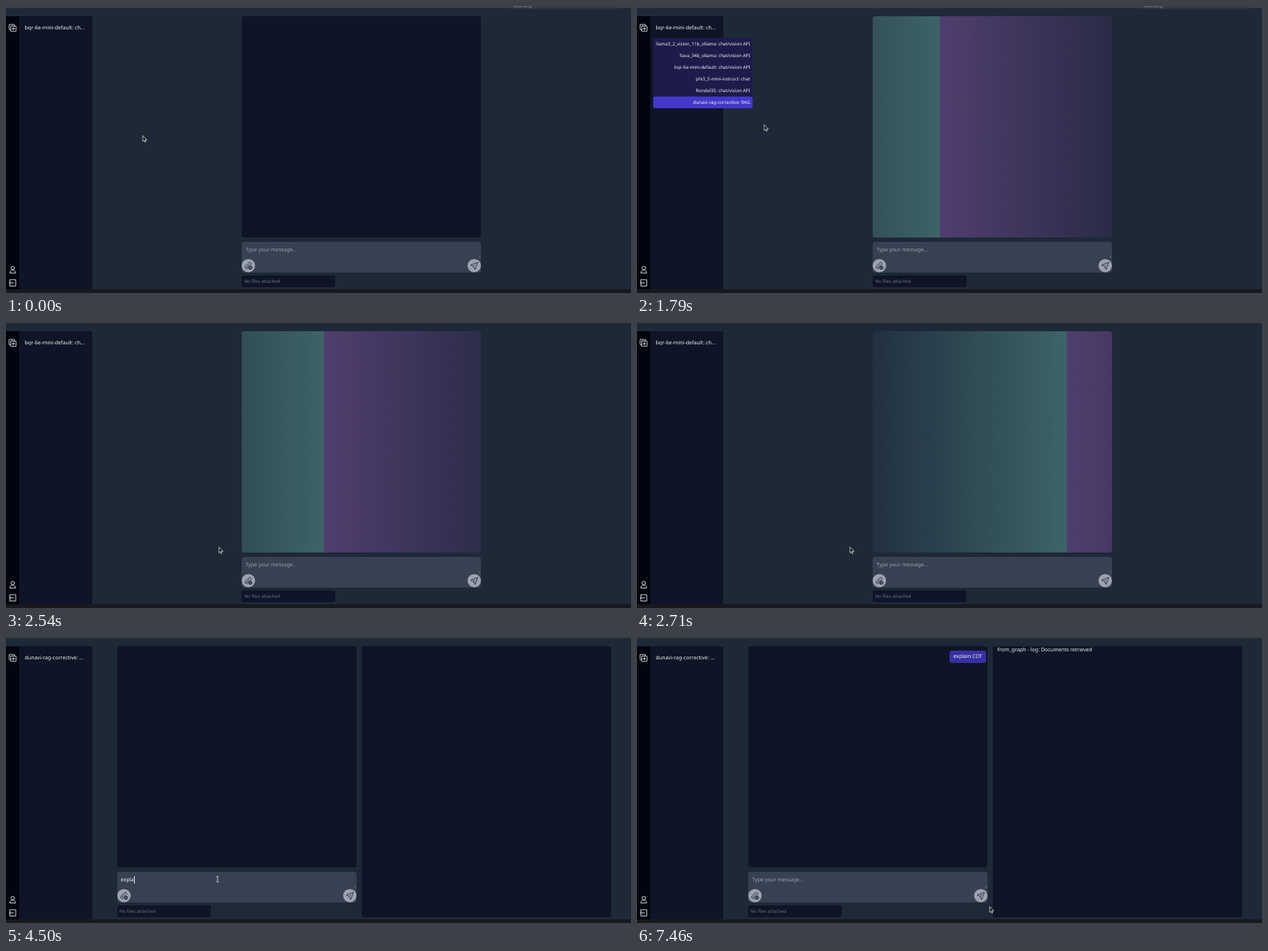
These frames come from a looping animation (854 px wide and 393 px high, 8 s). An HTML page:

```html
<!DOCTYPE html>
<html lang="en">
<head>
<meta charset="utf-8">
<title>Chat demo</title>
<style>
  :root {
    --panel: #0f1526;
    --loop: 8s infinite;
    --step: 8s step-end infinite;
  }
  html, body { margin: 0; width: 100%; height: 100%; overflow: hidden; }
  body {
    position: relative;
    background: #1e2937;
    color: #f3f4f6;
    font: 7.1px/10px "Noto Sans", sans-serif;
    text-rendering: geometricPrecision;
  }
  body *, .typed::before { position: absolute; box-sizing: border-box; }
  span { white-space: pre; }
  svg { left: 0; top: 0; overflow: visible; fill: none; stroke-linecap: round; stroke-linejoin: round; }
  svg * { position: static; }

  .strip { left: 0; width: 100%; }
  .top { top: 0; height: 3px; background: #3b3d40; }
  .bottom { top: 388px; bottom: 0; background: #17191d; }

  .rail { left: 0; top: 14px; width: 18px; height: 374px; background: #02040f; }
  .side { left: 18px; top: 14px; width: 99.5px; height: 374px; background: var(--panel); border-radius: 0 3px 3px 0; }
  .side span { left: 7.5px; top: 10.6px; }
  .before { animation: hide-late var(--step); }
  .after { opacity: 0; animation: show-late var(--step); }
  @keyframes hide-late { 0% { opacity: 1 } 36.45%, 100% { opacity: 0 } }
  @keyframes show-late { 0% { opacity: 0 } 36.45%, 100% { opacity: 1 } }

  /* recording notice */
  .notice {
    left: 688px; top: 0; width: 150px; height: 5px; overflow: hidden;
    background: #383b40; border-radius: 0 0 3px 3px;
    animation: notice var(--loop) linear;
  }
  .notice span { left: 3px; top: -4.6px; font-size: 5.8px; color: #fff; }
  @keyframes notice {
    0%, .5% { opacity: .45; transform: scaleX(.98) }
    3.1%, 21.25% { opacity: 1; transform: none }
    22.375% { opacity: .45; transform: scaleX(.98) }
    24%, 100% { opacity: 0; transform: scaleX(.96) }
  }

  /* chat column */
  .chat { left: 322px; top: 0; width: 327px; height: 100%; animation: dock var(--step); }
  @keyframes dock { 0% { left: 322px } 36.45%, 100% { left: 151.5px } }
  .log, .loader { left: 0; top: 14px; width: 100%; height: 302.5px; border-radius: 3px; background: var(--panel); }
  .loader {
    background: linear-gradient(90deg, #503e6e, #1c2438 50%, #3c6466) 0 0 / 654px 100%;
    opacity: 0;
    animation: loading var(--step), shimmer calc(8s / 11) linear infinite;
  }
  @keyframes loading { 0% { opacity: 0 } 20.75% { opacity: 1 } 36.45%, 100% { opacity: 0 } }
  @keyframes shimmer { from { background-position: 443.3px 0 } to { background-position: 1097.3px 0 } }

  .bubble {
    left: 275px; top: 19.5px; width: 50px; height: 17.5px; border-radius: 3.5px;
    background: #3730a3; line-height: 17px; text-align: center;
    opacity: 0; animation: sent var(--step);
  }
  @keyframes sent { 0% { opacity: 0 } 75%, 100% { opacity: 1 } }

  .input { left: 0; top: 323px; width: 100%; height: 42px; border-radius: 4px; background: #374151; }
  .hint, .typed { left: 5.3px; top: 5.8px; }
  .hint { color: #9ca3af; animation: hint var(--step); }
  @keyframes hint { 0% { opacity: 1 } 46.85% { opacity: 0 } 75%, 100% { opacity: 1 } }
  .typed { opacity: 0; animation: focus var(--step); }
  @keyframes focus { 0% { opacity: 0 } 36.45% { opacity: 1 } 75%, 100% { opacity: 0 } }
  .typed::before {
    content: ""; left: 0; top: 0; height: 10px;
    border-right: .7px solid #f3f4f6;
    animation: type var(--step);
  }
  @keyframes type {
    0% { content: "" }
    46.85% { content: "e" }
    48.5% { content: "ex" }
    51% { content: "exp" }
    52.1% { content: "expl" }
    56.2% { content: "expla" }
    58.35% { content: "explai" }
    59.35% { content: "explain" }
    60.35% { content: "explain " }
    64.1% { content: "explain C" }
    66.1% { content: "explain CO" }
    67.75% { content: "explain COT" }
    75%, 100% { content: "" }
  }
  .files { left: 0; top: 369px; width: 128px; height: 15.5px; border-radius: 3px; background: var(--panel); }
  .files span { left: 3.4px; top: 2.6px; font-size: 6.22px; color: #6b7280; }

  /* trace panel */
  .trace {
    left: 485.5px; top: 14px; width: 341.5px; height: 370.5px; border-radius: 3px;
    background: var(--panel); animation: fly var(--loop) linear;
  }
  .trace span { left: 7px; top: -.4px; opacity: 0; animation: traced var(--step); }
  @keyframes fly {
    0% { opacity: 0; transform: translateX(20px) }
    36.6% { opacity: 0; transform: translateX(20px); animation-timing-function: cubic-bezier(.215, .61, .355, 1) }
    41.5%, 100% { opacity: 1; transform: none }
  }
  @keyframes traced { 0% { opacity: 0 } 93.2%, 100% { opacity: 1 } }

  /* model menu */
  .menu {
    left: 22px; top: 43.5px; width: 136px; height: 96px; border-radius: 3px;
    background: #1e1b4b; opacity: 0; animation: menu var(--step);
  }
  @keyframes menu { 0% { opacity: 0 } 14% { opacity: 1 } 23.75%, 100% { opacity: 0 } }
  .menu div { left: 0; width: 100%; height: 16px; border-radius: 3px; background: #4338ca; animation: hover var(--step); }
  @keyframes hover {
    0% { top: 0; opacity: 0 }
    16.5% { top: 0; opacity: 1 }
    17% { top: 16px }
    17.5% { top: 32px }
    18% { top: 48px }
    18.45% { top: 64px; opacity: 1 }
    19.15%, 100% { top: 80px; opacity: 1 }
  }
  .menu span { right: 3.5px; top: 0; text-align: right; font-size: 6.22px; line-height: 16px; }

  /* pointer */
  .pointer { left: 0; top: 0; animation: move var(--loop) linear; }
  @keyframes move {
    0% { transform: translate(187px, 178px) }
    5.25% { transform: translate(187px, 178px); animation-timing-function: ease-in-out }
    12.5% { transform: translate(72px, 28px) }
    15.625% { transform: translate(72px, 30px) }
    18.25% { transform: translate(78px, 117px) }
    18.75% { transform: translate(79px, 127px) }
    20.25% { transform: translate(79px, 128px) }
    22.375% { transform: translate(173px, 162px); animation-timing-function: ease-out }
    25.5% { transform: translate(291px, 310px) }
    36.5% { transform: translate(291px, 310px); animation-timing-function: ease-in-out }
    41.25% { transform: translate(289px, 333px) }
    75% { transform: translate(289px, 333px); animation-timing-function: ease-in-out }
    80.5% { transform: translate(505px, 352px); animation-timing-function: ease-in-out }
    84.875%, 100% { transform: translate(482px, 371px) }
  }
  .arrow { animation: arrow var(--step); }
  .hand { opacity: 0; animation: hand var(--step); }
  .beam { opacity: 0; animation: beam var(--step); }
  @keyframes arrow {
    0% { opacity: 1 } 10.5% { opacity: 0 } 22% { opacity: 1 }
    39.25% { opacity: 0 } 79% { opacity: 1 } 100% { opacity: 1 }
  }
  @keyframes hand { 0% { opacity: 0 } 10.5% { opacity: 1 } 22%, 100% { opacity: 0 } }
  @keyframes beam { 0% { opacity: 0 } 39.25% { opacity: 1 } 79%, 100% { opacity: 0 } }
</style>
</head>
<body>
  <div class="strip top"></div>
  <div class="strip bottom"></div>
  <div class="notice"><span>recording</span></div>

  <div class="rail"></div>
  <div class="side">
    <span class="before">bqr-6e-mini-default: ch...</span>
    <span class="after">dunavi-rag-corrective: ...</span>
  </div>
  <svg width="18" height="393" stroke="#e5e7eb" stroke-width=".9">
    <path d="M6 32.5H5a.8.8 0 0 1-.8-.8V26a.8.8 0 0 1 .8-.8h5.7a.8.8 0 0 1 .8.8v1"/>
    <rect x="6.4" y="27.4" width="7.4" height="7.4" rx=".8"/>
    <path d="M10.1 29.2v3.8M8.2 31.1H12"/>
    <circle cx="9.2" cy="358.8" r="2.4"/>
    <path d="M5.2 365.3c0-5 8-5 8 0z"/>
    <path d="M5 377.4v-2.6h8.3v8.6H5v-2.6M10.5 379.1H4.6M6.4 377.3l-1.8 1.8 1.8 1.8"/>
  </svg>

  <div class="chat">
    <div class="log"></div>
    <div class="loader"></div>
    <div class="bubble">explain COT</div>
    <div class="input">
      <span class="hint">Type your message...</span>
      <span class="typed"></span>
    </div>
    <div class="files"><span>No files attached</span></div>
    <svg width="327" height="393" stroke="#1f2937" stroke-width=".9">
      <path d="M323.5 344.5l2.5-2.5M325.2 344.7l.9-.9" stroke="#7b8491" stroke-width=".5"/>
      <g fill="#9ca3af" stroke="none">
        <circle cx="9.2" cy="355.6" r="9.2"/>
        <circle cx="317.8" cy="355.6" r="9.2"/>
      </g>
      <path d="M7.6 359.8l-1.2-.1c-1.9-.6-2.3-2.5-1-3.8l4.4-4.2c1.8-1.5 4.4.7 2.9 2.6l-4 3.9c-1 .8-2.2-.4-1.4-1.4l3.2-3.1"/>
      <circle cx="11.8" cy="358.3" r="2.6" fill="#1f2937" stroke="none"/>
      <path d="M11.8 357v2.6M10.5 358.3h2.6" stroke="#9ca3af" stroke-width=".6"/>
      <path d="M322.3 351.2l-9.3 3.5 3.8 1.9 2 3.9zM316.8 356.6l2.2-2.1"/>
    </svg>
  </div>

  <div class="trace"><span>from_graph - log: Documents retrieved</span></div>

  <div class="menu">
    <div></div>
    <span>llama3_2_vision_11b_ollama: chat/vision API
llava_34b_ollama: chat/vision API
bqr-6e-mini-default: chat/vision API
phi3_5-mini-instruct: chat
Rondel35: chat/vision API
dunavi-rag-corrective: RAG</span>
  </div>

  <svg class="pointer" width="10" height="12" fill="#0a0a0a" stroke="#fff" stroke-width=".7">
    <path class="arrow" fill="#0a0a0a" d="M0 0v7.4l1.7-1.5 1.2 2.7 1.2-.5-1.2-2.7h2.3z"/>
    <path class="hand" fill="#0a0a0a" d="M-.7 .6q.7-1 1.4 0v3l3 .7q.8.3.7 1.2l-.5 2.6-.7 1.6H-.3l-2.4-3.1q-.2-1 .7-.9l1.3.9z"/>
    <path class="beam" fill="none" d="M-1.3-3.8Q0-3.8 0-3 0-3.8 1.3-3.8M0-3v6M-1.3 3.8Q0 3.8 0 3 0 3.8 1.3 3.8"/>
  </svg>
</body>
</html>
```
